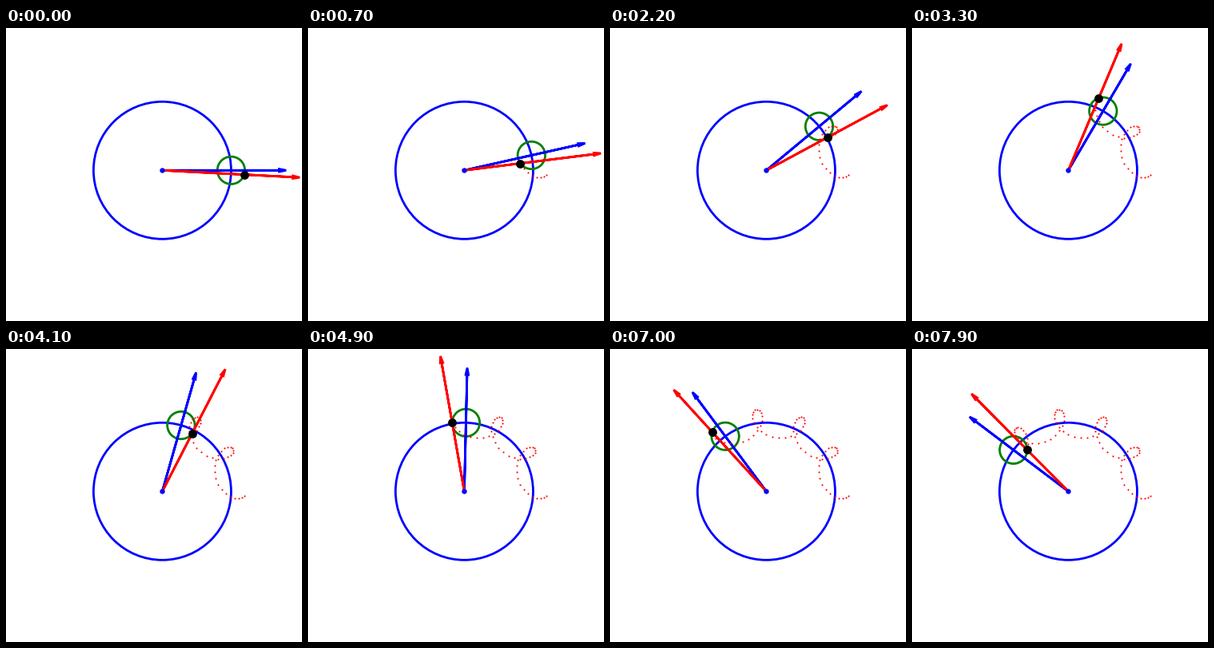
A matplotlib script that plays this animation: 370 by 367 pixels, repeating every 8000 ms.

```python
import numpy as np
import matplotlib.pyplot as plt
from matplotlib.animation import FuncAnimation
from matplotlib.patches import Circle, FancyArrow

W, H, DPI = 370, 367, 100
UNIT = 17.2                # pixels per data unit
CX, CY = 195.4, 178.3      # hub position in pixels from the top left
R, r = 5, 1                # deferent and epicycle radii
FRAMES = 80

n = np.arange(FRAMES)
theta = 2 * np.pi * n / 199
phi = -2 * np.pi * (n + 1) / 20
ex, ey = R * np.cos(theta), R * np.sin(theta)
px, py = ex + r * np.cos(phi), ey + r * np.sin(phi)
sight = np.arctan2(py, px)

fig = plt.figure(figsize=(W / DPI, H / DPI), dpi=DPI, facecolor="white")
ax = fig.add_axes([0, 0, 1, 1])
ax.set_xlim(-CX / UNIT, (W - CX) / UNIT)
ax.set_ylim(-(H - CY) / UNIT, CY / UNIT)
ax.axis("off")


def ring(center, radius, color):
    return ax.add_patch(Circle(center, radius, fill=False, ec=color, lw=2))


def arrow(length, color):
    return ax.add_patch(FancyArrow(
        0, 0, length, 0, width=0.001, head_width=0.2, head_length=0.5,
        length_includes_head=True, color=color, lw=2))


def point_arrow(patch, length, angle):
    patch.set_data(dx=length * np.cos(angle), dy=length * np.sin(angle))


def dots(color, size, z):
    return ax.plot([], [], "o", color=color, ms=size, mew=0, zorder=z)[0]


ring((0, 0), R, "blue")
epicycle = ring((R, 0), r, "green")
mean_arrow = arrow(9, "blue")
sight_arrow = arrow(10, "red")
trail = dots("red", 1.5, 2)
dots("blue", 4.6, 3).set_data([0], [0])
planet = dots("black", 7.8, 4)


def update(i):
    epicycle.center = ex[i], ey[i]
    point_arrow(mean_arrow, 9, theta[i])
    point_arrow(sight_arrow, 10, sight[i])
    trail.set_data(px[:i + 1], py[:i + 1])
    planet.set_data([px[i]], [py[i]])
    return epicycle, mean_arrow, sight_arrow, trail, planet


anim = FuncAnimation(fig, update, frames=FRAMES, interval=100,
                     repeat=True, repeat_delay=0, blit=False)
plt.show()
```
